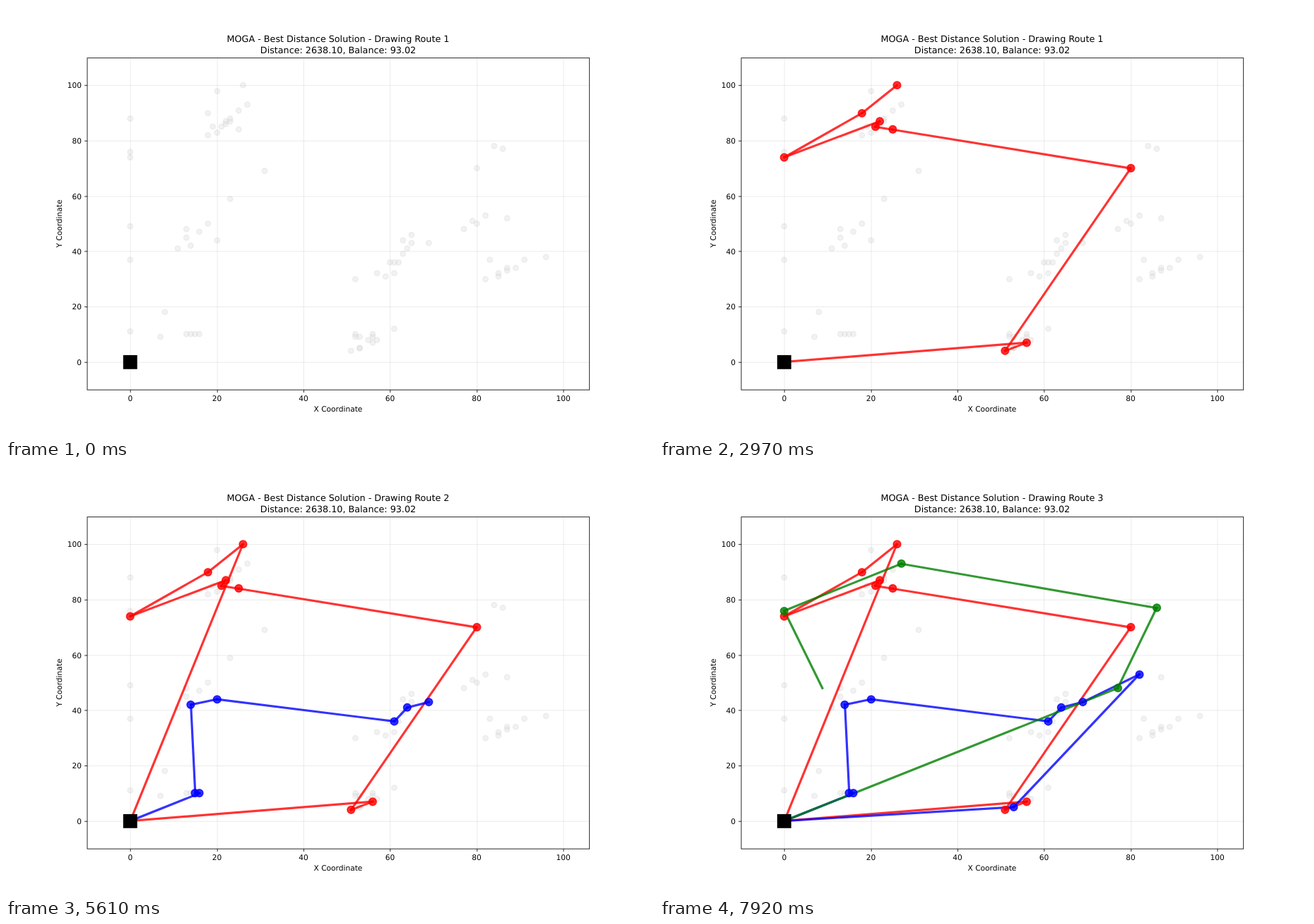
An HTML page that plays this animation: 917 by 611 pixels, repeating every 8000 ms.

```html
<!DOCTYPE html>
<html lang="en">
<head>
<meta charset="utf-8">
<title>Route drawing</title>
<style>
  html, body { margin: 0; width: 100%; height: 100%; overflow: hidden; background: #fff; }
  svg { display: block; width: 917px; height: 611px; font: 13.89px "DejaVu Sans", sans-serif; }
  text { text-anchor: middle; text-rendering: geometricPrecision; }
  .title { font-size: 16.67px; }
  .right { text-anchor: end; }
  .grid { stroke: #b0b0b0; stroke-opacity: .3; stroke-width: 1.11; }
  .axis { stroke: #000; stroke-width: 1.11; fill: none; }
  .stop { fill: lightgray; stroke: lightgray; fill-opacity: .3; stroke-opacity: .3; stroke-width: 2.08; }
  .leg { stroke-width: 4.17; stroke-opacity: .8; stroke-linecap: square; }
  .visit { stroke-width: 2.08; fill-opacity: .8; stroke-opacity: .8; }
</style>
</head>
<body>
<svg viewBox="0 0 1200 800" preserveAspectRatio="none">
  <g id="chart"></g>
  <text class="title" id="title" x="615" y="67"></text>
  <text class="title" x="615" y="87.5">Distance: 2638.10, Balance: 93.02</text>
  <g id="legs"></g>
  <g id="visits"></g>
  <rect x="217" y="648" width="26" height="26"/>
  <rect class="axis" x="150.5" y="96.5" width="930" height="616"/>
</svg>
<script>
const LOOP = 8000, STEP = 330, STEPS_PER_ROUTE = 10;
const LEFT = 150.5, RIGHT = 1080.5, TOP = 96.5, BOTTOM = 712.5;
const DEPOT = [0, 0];

// legs: number of legs in the full round trip, including the return
const routes = [
  { color: 'red', legs: 10, stops: [[56, 7], [51, 4], [80, 70], [25, 84], [21, 85], [22, 87], [0, 74], [18, 90], [26, 100]] },
  { color: 'blue', legs: 10, stops: [[16, 10], [15, 10], [14, 42], [20, 44], [61, 36], [64, 41], [69, 43], [82, 53], [53, 5]] },
  { color: 'green', legs: 12, stops: [[77, 48], [86, 77], [27, 93], [0, 76], [11, 41]] },
];

// Unvisited stops lie along short bands: from, to, how many
const bands = [
  [[0, 88], [0, 49], 2], [[0, 37], [0, 11], 2], [[7, 9], [8, 18], 2], [[13, 10], [14, 10], 2],
  [[13, 45], [18, 50], 4], [[23, 59], [31, 69], 2], [[18, 82], [23, 88], 6], [[20, 98], [25, 91], 2],
  [[52, 30], [57, 32], 2], [[59, 31], [65, 46], 8], [[79, 51], [80, 50], 2], [[84, 78], [87, 52], 2],
  [[82, 30], [89, 34], 6], [[83, 37], [96, 38], 3], [[52, 10], [57, 8], 7], [[53, 5], [61, 12], 2],
];

const $ = id => document.getElementById(id);
const px = x => 150 + (x + 10) * 930 / 116;
const py = y => 712 - (y + 10) * 616 / 120;
const mix = (a, b, t) => a.map((v, i) => v + (b[i] - v) * t);
const line = (cls, x1, y1, x2, y2, extra = '') =>
  `<line class="${cls}" x1="${x1}" y1="${y1}" x2="${x2}" y2="${y2}" ${extra}/>`;
const dot = (cls, [x, y], r, extra = '') =>
  `<circle class="${cls}" cx="${Math.round(px(x))}" cy="${Math.round(py(y))}" r="${r}" ${extra}/>`;
const label = (x, y, text, extra = '') => `<text x="${x}" y="${y}" ${extra}>${text}</text>`;

let seed = 7;
const random = () => (seed = seed * 16807 % 2147483647) / 2147483647;

function bandStops([from, to, count]) {
  return Array.from({ length: count }, (_, i) => {
    const inner = i > 0 && i < count - 1;
    return mix(from, to, i / (count - 1)).map(v => Math.round(v + (inner ? random() * 3 - 1.5 : 0)));
  });
}

function drawChart() {
  const stops = [...bands.flatMap(bandStops), ...routes.flatMap(r => r.stops)];
  let out = stops.map(p => dot('stop', p, 4.91)).join('');
  for (let v = 0; v <= 100; v += 20) {
    const x = Math.round(px(v)) + .5, y = Math.round(py(v)) + .5;
    out += line('grid', x, TOP, x, BOTTOM) + line('grid', LEFT, y, RIGHT, y)
      + line('axis', x, BOTTOM, x, BOTTOM + 5) + line('axis', LEFT - 5, y, LEFT, y)
      + label(px(v), 733, v) + label(140, y + 5, v, 'class="right"');
  }
  out += label(615, 753, 'X Coordinate')
    + label(0, 0, 'Y Coordinate', 'transform="translate(104 404) rotate(-90)"');
  $('chart').innerHTML = out;
}

function drawRoutes(step) {
  let legs = '', visits = '';
  routes.forEach(({ color, legs: total, stops }, i) => {
    const local = Math.min(STEPS_PER_ROUTE, Math.max(0, step - i * STEPS_PER_ROUTE));
    const progress = local * total / STEPS_PER_ROUTE;
    const path = [DEPOT, ...stops, DEPOT];
    for (let k = 0; k < progress; k++) {
      const part = Math.min(1, progress - k);
      const from = path[k], tip = mix(from, path[k + 1], part);
      legs += line('leg', px(from[0]), py(from[1]), px(tip[0]), py(tip[1]), `stroke="${color}"`);
      if (part === 1 && k < stops.length) visits += dot('visit', tip, 6.94, `fill="${color}" stroke="${color}"`);
    }
  });
  $('legs').innerHTML = legs;
  $('visits').innerHTML = visits;
  $('title').textContent =
    `MOGA - Best Distance Solution - Drawing Route ${Math.floor(step / STEPS_PER_ROUTE) + 1}`;
}

const start = performance.now();
let shown = -1;
function tick() {
  const step = Math.floor((performance.now() - start) % LOOP / STEP);
  if (step !== shown) drawRoutes(shown = step);
  requestAnimationFrame(tick);
}
drawChart();
tick();
</script>
</body>
</html>
```
